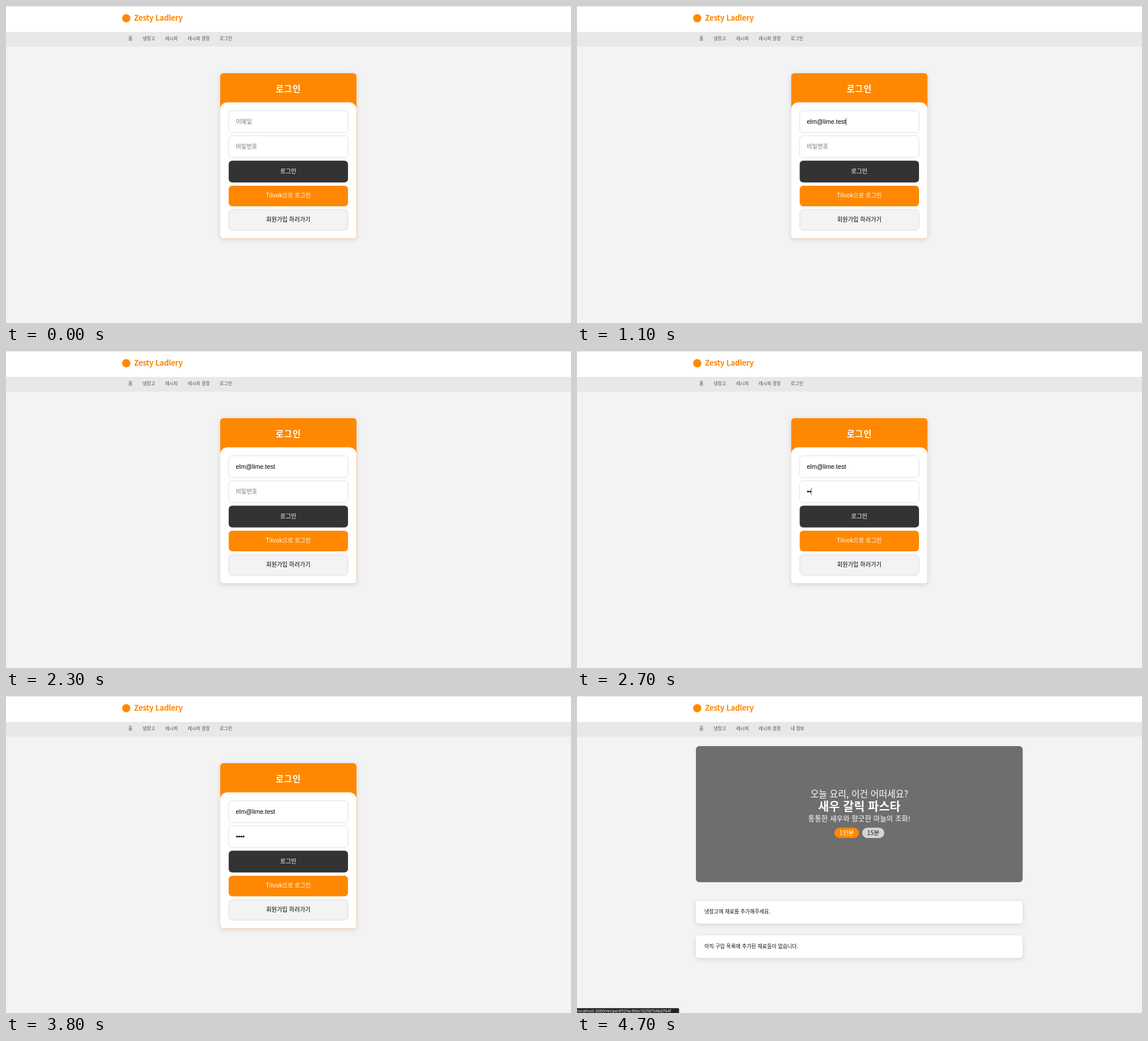
An HTML page that plays this animation: 960 px wide and 538 px high, repeating every 5 s.

```html
<!DOCTYPE html>
<html lang="ko">
<head>
<meta charset="utf-8">
<title>로그인</title>
<style>
html, body { margin: 0; width: 100%; height: 100%; overflow: hidden; background: #f3f3f3; }
svg { display: block; width: 960px; height: 538px; }
text { font-family: "Noto Sans CJK KR", "Noto Sans CJK", "Noto Sans", sans-serif; }
.mid { text-anchor: middle; }
.nav { font-size: 7.7px; font-weight: 500; fill: #505050; }
.brand { font-size: 13px; font-weight: 600; letter-spacing: -.3px; fill: #ff8800; }
.title { font-size: 14.6px; font-weight: 700; letter-spacing: .9px; fill: #fff; }
.hint { font-size: 9.9px; fill: #757575; }
.label { font-size: 9.9px; }
.typed { font: 10.5px "Liberation Sans", Arial, sans-serif; }
.note { font-size: 8.75px; font-weight: 500; fill: #111; }
.tip { font: 6.55px Inter, sans-serif; fill: #fff; }
.card { filter: drop-shadow(0 2px 4px rgba(0,0,0,.13)); }
.field { fill: #fff; stroke: #e4e4e4; stroke-width: .8; filter: drop-shadow(0 .8px .8px rgba(0,0,0,.1)); }
.caret { fill: #000; }

/* one loop = 5 s, so 2% = 100 ms */
.a { animation: 5s step-end infinite; }
.login { animation-name: login; }
.home { animation-name: home; }
.mark { animation-name: mark; }
.brand { animation-name: brand; }
.tipbox { animation-name: tipbox; }
.mailHint { animation-name: mailHint; }
.mail { animation-name: mail; }
.mailCaret { animation-name: mailCaret; }
.passHint { animation-name: passHint; }
.passCaret { animation-name: passCaret; }
.d1 { animation-name: d1; }
.d2 { animation-name: d2; }
.d3 { animation-name: d3; }
.d4 { animation-name: d4; }

@keyframes login { 0% { opacity: 1 } 90%, 100% { opacity: 0 } }
@keyframes home { 0% { opacity: 0 } 90%, 100% { opacity: 1 } }
@keyframes mark { 0% { opacity: 1 } 90% { opacity: 0 } 92%, 100% { opacity: 1 } }
@keyframes brand {
  0% { transform: none }
  90% { transform: translate(-15.7px, -.6px) }
  92%, 100% { transform: none }
}
@keyframes tipbox { 0% { opacity: 0 } 94%, 100% { opacity: 1 } }
@keyframes mailHint { 0% { opacity: 1 } 22%, 100% { opacity: 0 } }
@keyframes mail { 0% { opacity: 0 } 22%, 100% { opacity: 1 } }
@keyframes mailCaret {
  0% { opacity: 0; transform: none }
  2% { opacity: 1; transform: none }
  12% { opacity: 0; transform: none }
  22% { opacity: 1; transform: translateX(66.6px) }
  32%, 100% { opacity: 0; transform: translateX(66.6px) }
}
@keyframes passHint { 0% { opacity: 1 } 48%, 100% { opacity: 0 } }
@keyframes passCaret {
  0% { opacity: 0; transform: none }
  38% { opacity: 1; transform: none }
  46% { opacity: 0; transform: none }
  48% { opacity: 1; transform: translateX(3.65px) }
  54% { opacity: 1; transform: translateX(7.3px) }
  60% { opacity: 1; transform: translateX(10.95px) }
  66% { opacity: 1; transform: translateX(14.6px) }
  76%, 100% { opacity: 0; transform: translateX(14.6px) }
}
@keyframes d1 { 0% { opacity: 0 } 48%, 100% { opacity: 1 } }
@keyframes d2 { 0% { opacity: 0 } 54%, 100% { opacity: 1 } }
@keyframes d3 { 0% { opacity: 0 } 60%, 100% { opacity: 1 } }
@keyframes d4 { 0% { opacity: 0 } 66%, 100% { opacity: 1 } }
</style>
</head>
<body>
<svg viewBox="0 0 960 538">
  <rect width="960" height="538" fill="#f3f3f3"/>

  <!-- header -->
  <rect width="960" height="44" fill="#fff"/>
  <rect width="960" height="1" fill="#e2e2e2"/>
  <rect y="44" width="960" height="25" fill="#e8e8e8"/>
  <circle class="a mark" cx="204.3" cy="20.8" r="7" fill="#ff8800"/>
  <text class="a brand" x="217.6" y="25.3">Zesty Ladlery</text>
  <g class="nav">
    <text x="207.7" y="58.3">홈</text>
    <text x="232" y="58.3">냉장고</text>
    <text x="270.5" y="58.3">레시피</text>
    <text x="308.8" y="58.3">레시피 광장</text>
    <text class="a login" x="363" y="58.3">로그인</text>
    <text class="a home" x="363" y="58.3">내 정보</text>
  </g>

  <!-- login page -->
  <g class="a login">
    <g class="card">
      <rect x="364" y="114" width="231.5" height="280.5" rx="5.5" fill="#ff8800"/>
      <path d="M364 175.500a12 12 0 0 1 12-12H583.500a12 12 0 0 1 12 12V389a5.500 5.500 0 0 1-5.500 5.500H369.500a5.500 5.500 0 0 1-5.500-5.500Z" fill="#fff"/>
    </g>
    <text class="title mid" x="479.8" y="145.600">로그인</text>

    <rect class="field" x="378.5" y="178" width="202.500" height="36.500" rx="6"/>
    <text class="hint a mailHint" x="390.5" y="199.600">이메일</text>
    <text class="typed a mail" x="390.5" y="200">elm@lime.test</text>
    <rect class="caret a mailCaret" x="390.600" y="190.300" width=".7" height="12.200"/>

    <rect class="field" x="378.5" y="220.400" width="202.500" height="36.500" rx="6"/>
    <text class="hint a passHint" x="390.5" y="241.800">비밀번호</text>
    <circle class="a d1" cx="392.600" cy="238.500" r="1.600"/>
    <circle class="a d2" cx="396.250" cy="238.500" r="1.600"/>
    <circle class="a d3" cx="399.900" cy="238.500" r="1.600"/>
    <circle class="a d4" cx="403.550" cy="238.500" r="1.600"/>
    <rect class="caret a passCaret" x="390.600" y="232.300" width=".7" height="12.200"/>

    <rect x="378.400" y="262.400" width="202.700" height="37" rx="6" fill="#333"/>
    <text class="label mid" x="479.700" y="284" fill="#fff">로그인</text>
    <rect x="378.400" y="305" width="202.700" height="35" rx="6" fill="#ff8800"/>
    <text class="label mid" x="479.700" y="325.300" fill="#fff">Tilvok으로 로그인</text>
    <rect class="field" x="378.800" y="345.900" width="202" height="34.300" rx="6" style="fill:#f3f3f3;stroke:#dcdcdc"/>
    <text class="label mid" x="479.700" y="365.700" font-weight="500">회원가입 하러가기</text>
  </g>

  <!-- home page -->
  <g class="a home">
    <rect x="202" y="85" width="555.300" height="231" rx="6" fill="#6e6e6e"/>
    <g class="mid" fill="#fff">
      <text x="479.700" y="172.200" font-size="15.400" font-weight="300">오늘 요리, 이건 어떠세요?</text>
      <text x="479.700" y="194.800" font-size="20" font-weight="700">새우 갈릭 파스타</text>
      <text x="479.700" y="212.600" font-size="12.150" font-weight="300">통통한 새우와 향긋한 마늘의 조화!</text>
    </g>
    <rect x="437.300" y="223.500" width="41.700" height="17.500" rx="8.750" fill="#ff8800"/>
    <rect x="484.700" y="223.500" width="37.300" height="17.500" rx="8.750" fill="#d5d5d5"/>
    <g class="mid" font-size="10.400" font-weight="500">
      <text x="458.200" y="235.600" fill="#fff">1인분</text>
      <text x="503.300" y="235.600" fill="#222">15분</text>
    </g>
    <g class="card" fill="#fff">
      <rect x="202" y="348" width="555.300" height="38.200" rx="5.500"/>
      <rect x="202" y="406.300" width="555.300" height="38.200" rx="5.500"/>
    </g>
    <text class="note" x="216.500" y="369.300">냉장고에 재료를 추가해주세요.</text>
    <text class="note" x="216.500" y="427.700">아직 구입 목록에 추가된 재료들이 없습니다.</text>
  </g>

  <!-- status bubble -->
  <g class="a tipbox">
    <path d="M0 529.700H171.500a2 2 0 0 1 2 2V538H0Z" fill="#202124"/>
    <text class="tip" x=".8" y="537.400">localhost:3000/recipe/652fac90bc102fd704bd764f</text>
  </g>
</svg>
</body>
</html>
```
